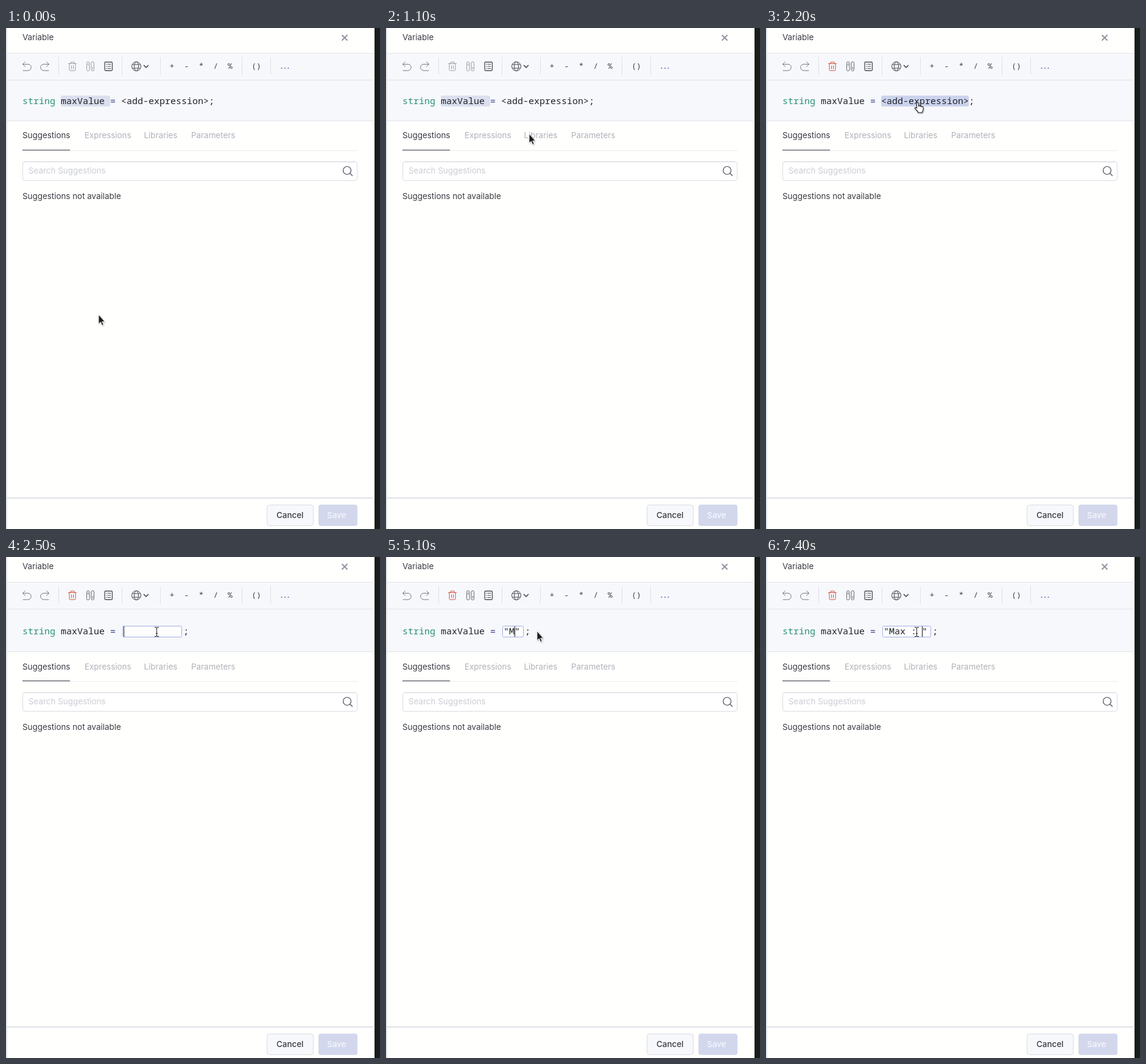
Recreate the animation shown at these times as an HTML page. Size 614 px wide and 823 px high, loop 8000 ms.

```html
<!DOCTYPE html>
<html lang="en">
<head>
<meta charset="utf-8">
<title>Variable form</title>
<style>
  html, body { margin: 0; width: 100%; height: 100%; overflow: hidden; background: #fffffd; }
  svg { display: block; width: 614px; height: 823px; }
  text { font: 13.4px Inter, sans-serif; fill: #3a3b44; white-space: pre; }
  .code text { font: 15px "Noto Sans Mono", monospace; fill: #20222a; }
  .ops text { font: 13px "Noto Sans Mono", monospace; fill: #40434c; text-anchor: middle; }
  .code .type { fill: #2a8f79; }
  .code .equals { fill: #2b3a86; }
  .dim { fill: #b0b2ba; }
  .hint { fill: #cbcdd4; }
  .button { font-weight: 500; }
  .line { stroke: #dfe2e8; }
  .icon { fill: none; stroke: #4a4d57; stroke-linecap: round; stroke-linejoin: round; }
  .muted { stroke: #777a83; }
  #trash, #columns { stroke: #9a9da5; }
  .active #trash { stroke: #d0513f; }
  .active #columns { stroke: #666972; }
  #field { fill: #fff; stroke: #a3afe8; }
  #caret { fill: #111; }
  .pointer { display: none; }
</style>
</head>
<body>
<svg id="stage" viewBox="0 0 614 823">
  <defs>
    <filter id="soft" x="-50%" y="-50%" width="200%" height="200%">
      <feDropShadow dx="0.6" dy="1" stdDeviation="0.8" flood-opacity="0.35"/>
    </filter>
  </defs>
  <rect width="614" height="823" fill="#fffffd"/>
  <rect id="panel" x="2" y="41" width="600" height="112" fill="#f7f8fb"/>
  <rect width="2" height="823" fill="#dfe2e5"/>
  <rect x="605" width="9" height="823" fill="#191e1a"/>
  <path class="line" d="M2 41.5H602M2 85.5H602M86.5 48V77M190.5 48V77M253.5 48V77M387.5 48V77M434.5 48V77"/>

  <text x="27" y="20">Variable</text>
  <path d="M551.5 11.5l9 9m0-9l-9 9" stroke="#9295a0" stroke-width="2"/>

  <g class="icon">
    <path class="muted" d="M31.5 55.500l-4 4 4 4M27.500 59.500H36a5.200 5.200 0 0 1 0 10.500H28"/>
    <path class="muted" d="M66.500 55.500l4 4-4 4M70.500 59.500H62a5.200 5.200 0 0 0 0 10.500H70"/>
    <path id="trash" d="M102.500 58.500h13M106 58.500v-2.500h6v2.500M104 58.500v10q0 1.500 1.500 1.500h7q1.500 0 1.500-1.500v-10M107.500 62v5M110.500 62v5"/>
    <g id="columns">
      <rect x="132.500" y="55.500" width="4.500" height="15" rx="2"/>
      <rect x="140" y="55.500" width="4.500" height="15" rx="2"/>
      <path d="M134.750 58.500v3M142.250 64.500v3"/>
    </g>
    <rect x="162" y="56" width="12.500" height="14" rx="1.500" stroke-width="1.300"/>
    <path d="M164.500 59.500h.5m2 0h5M164.500 63h.5m2 0h5M164.500 66.500h.5m2 0h5" stroke-width="1.200"/>
    <circle cx="214" cy="63" r="7.500"/>
    <ellipse cx="214" cy="63" rx="3.500" ry="7.500"/>
    <path d="M207.500 60h13M207.500 66h13"/>
    <path d="M226.500 61.500l3.500 3.500 3.500-3.500" stroke-width="1.700"/>
  </g>
  <g class="ops">
    <text x="272.500" y="67">+</text>
    <text x="296.500" y="67">-</text>
    <text x="320.500" y="67">*</text>
    <text x="344.500" y="67">/</text>
    <text x="368" y="67">%</text>
    <text x="411" y="67">()</text>
  </g>
  <path d="M452.500 66h.01m5.500 0h.01m5.500 0h.01" stroke="#626eb5" stroke-width="2" stroke-linecap="round"/>

  <g class="code">
    <rect id="nameMark" x="90" y="111" width="81" height="18" rx="3" fill="#dbdfee"/>
    <rect id="exprMark" x="189" y="111" width="144" height="18" rx="3"/>
    <g id="statement">
      <text class="type" x="27" y="125">string</text>
      <text x="90" y="125">maxValue</text>
      <text class="equals" x="171" y="125">=</text>
      <text id="expr" x="189" y="125">&lt;add-expression&gt;</text>
      <text id="end" x="333" y="125">;</text>
    </g>
    <g id="editor">
      <rect id="field" x="191.500" y="113.500" width="97" height="18" rx="2"/>
      <text id="typed" x="193" y="127"></text>
      <rect id="caret" y="114" width="1" height="17"/>
    </g>
  </g>

  <g id="tabs">
    <text x="27" y="181">Suggestions</text>
    <text class="dim" x="129" y="181">Expressions</text>
    <text class="dim" x="226.500" y="181">Libraries</text>
    <text class="dim" x="304" y="181">Parameters</text>
  </g>
  <g id="below">
    <path class="line" d="M2 152.500H602"/>
    <path d="M27 201.500H577" stroke="#ececf0"/>
    <path d="M27 200.500H105" stroke="#40424c"/>
    <rect x="27.500" y="219.500" width="549" height="31" rx="3.500" fill="#fff" stroke="#d9dce2"/>
    <path d="M29 220.500H575" stroke="#eff0f3"/>
    <text class="hint" x="37" y="239">Search Suggestions</text>
    <path class="icon" d="M553.500 234a6.500 6.500 0 1 0 13 0a6.500 6.500 0 1 0-13 0M565 239l3.500 3.500" stroke-width="1.200"/>
    <text x="27" y="281">Suggestions not available</text>
  </g>

  <path class="line" d="M2 772H602" stroke-width="2"/>
  <rect x="428.500" y="783.500" width="76" height="34" rx="4" fill="#f7f8fb" stroke="#d9dce3"/>
  <text class="button" x="444" y="805">Cancel</text>
  <rect x="513" y="783" width="64" height="35" rx="4" fill="#d2d7ec"/>
  <text class="button" x="527" y="805" style="fill:#f6f7fc">Save</text>

  <path id="arrow" class="pointer" filter="url(#soft)" fill="#1c1c1c" stroke="#fff" stroke-width=".8"
    d="M0 0V15l3.400-3 2.400 5.500 2.400-1-2.400-5.300h4.400z"/>
  <path id="hand" class="pointer" filter="url(#soft)" fill="#fff" stroke="#222" stroke-width="1.100" stroke-linejoin="round"
    d="M3.500 10V2.200q0-1.700 1.500-1.700t1.500 1.700V6.500q.3-1 1.500-.8t1.300 1.200q.4-.8 1.400-.5t1.200 1.300q.5-.6 1.400-.2t.8 1.600V12q0 2-1.500 3.300V17H5.500V15.500L1 10.800Q0 9.500 1 8.800t2.500 1.200z"/>
  <path id="beam" class="pointer" fill="none" stroke="#222"
    d="M0 .5h2q1.500 0 1.500 1.500V14q0 1.500-1.500 1.500H0M7 .5H5q-1.500 0-1.500 1.500M7 15.500H5q-1.500 0-1.500-1.500M2 10.500h3"/>
</svg>
<script>
  const LOOP = 8000, CHAR = 9, TEXT_X = 193;
  const $ = id => document.getElementById(id);
  const move = (el, x, y) => el.setAttribute("transform", `translate(${x} ${y})`);
  const show = (el, on) => { el.style.display = on ? "inline" : "none"; };

  // Each step changes only the listed parts of the state.
  const at = (x, y) => ({ x, y });
  const type = (text, caret = text.length - 1) => ({ text, caret });
  const steps = [
    [0, { pointer: "arrow", ...at(152, 471), mark: "none", chosen: false, editing: false, text: "", caret: -1 }],
    [800, at(163, 382)],
    [900, at(184, 297)],
    [1000, at(211, 225)],
    [1100, at(235, 174)],
    [1200, at(248, 146)],
    [1500, { pointer: "hand", ...at(244, 122), mark: "#e5e9ec" }],
    [2200, { mark: "#ccd3ed", chosen: true }],
    [2500, { pointer: "beam", ...at(244, 115), editing: true, caret: 0 }],
    [3100, { caret: -1 }],
    [3600, { pointer: "arrow", ...at(248, 122) }],
    [3900, type('""', 2)],
    [4200, { caret: 1 }],
    [4800, { caret: -1 }],
    [5100, type('"M"')],
    [5600, type('"Ma"')],
    [5900, type('"Max"')],
    [6200, { ...type('"Max "'), pointer: "beam", ...at(244, 115) }],
    [6800, { caret: -1 }],
    [7000, type('"Max :"')],
    [7400, type('"Max : "')]
  ];

  function draw(time) {
    const s = Object.assign({}, ...steps.filter(([t]) => t <= time).map(([, part]) => part));
    const width = s.text ? s.text.length * CHAR + 8 : 98;

    $("stage").classList.toggle("active", s.chosen);
    show($("nameMark"), !s.chosen);
    show($("exprMark"), !s.editing);
    $("exprMark").setAttribute("fill", s.mark);

    show($("expr"), !s.editing);
    show($("editor"), s.editing);
    $("end").setAttribute("x", s.editing ? 191 + width + 2 : 333);
    $("field").setAttribute("width", width - 1);
    $("typed").textContent = s.text;
    show($("caret"), s.caret >= 0);
    $("caret").setAttribute("x", TEXT_X + Math.max(s.caret, 0) * CHAR);

    // The taller input pushes the rest of the form down.
    move($("statement"), 0, s.editing ? 2 : 0);
    move($("tabs"), 0, s.editing ? 4 : 0);
    move($("below"), 0, s.editing ? 3 : 0);
    $("panel").setAttribute("height", s.editing ? 115 : 112);

    for (const id of ["arrow", "hand", "beam"]) show($(id), id === s.pointer);
    move($(s.pointer), s.x, s.y);
  }

  const start = performance.now();
  function tick() {
    draw((performance.now() - start) % LOOP);
    requestAnimationFrame(tick);
  }
  tick();
</script>
</body>
</html>
```
